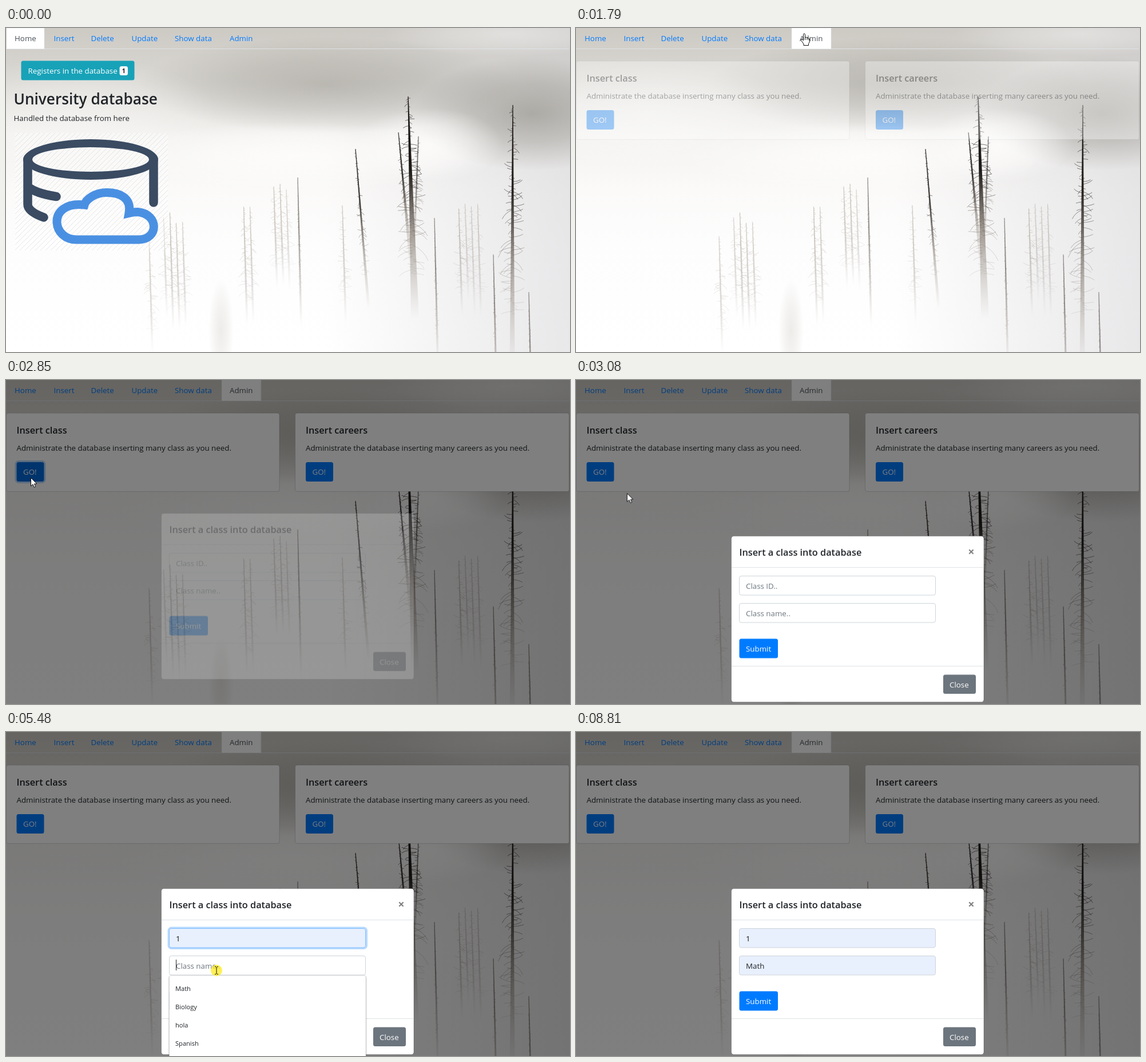
These frames come from a looping animation (986x568 px, 9.67 s). An HTML page with a canvas:

```html
<!DOCTYPE html>
<html lang="en">
<head>
<meta charset="utf-8">
<title>University database</title>
<style>
html, body { margin: 0; width: 986px; height: 568px; overflow: hidden; background: #fff; }
canvas, svg { position: absolute; left: 0; top: 0; display: block; }
svg { font: 13.34px 'Open Sans', 'Noto Sans', sans-serif; fill: #212529; }
.h5 { font-size: 16.3px; font-weight: 600; }
.h2 { font-size: 26.2px; font-weight: 600; }
.link { fill: #007bff; }
.light { fill: #fff; }
.tab { fill: #fff; stroke: #dee2e6; stroke-width: .6; }
.card { fill: #fff; stroke: rgba(0, 0, 0, .14); }
.modal { fill: #fff; stroke: rgba(0, 0, 0, .25); }
.rule { stroke: #dee2e6; }
.blue { fill: #007bff; }
.field { fill: #fff; stroke: #ced4da; }
.hint { fill: #6c757d; }
.ring { fill: none; stroke: rgba(0, 123, 255, .28); stroke-width: 3; }
.caret { stroke: #222; }
.list { font-size: 11.1px; font-weight: 500; filter: drop-shadow(0 1px 1px rgba(0, 0, 0, .45)); }
.list .box { fill: #fff; stroke: #d4d4d4; stroke-width: .6; }
.hot { fill: #e8e8e8; }
.bar { fill: none; stroke: #3a4b62; stroke-width: 15.5; stroke-linecap: round; }
.cursor { fill: #fff; stroke: #111; stroke-linejoin: round; }
</style>
</head>
<body>
<canvas id="photo" width="986" height="568"></canvas>
<svg width="986" height="568" viewBox="0 0 986 568">
  <defs>
    <pattern id="hatch" width="9" height="9" patternUnits="userSpaceOnUse">
      <path d="M-1 10L10 -1" stroke="#bbb" stroke-opacity=".45" stroke-width=".8"/>
    </pattern>
  </defs>

  <path class="rule" d="M0 36.5H984"/>
  <path class="tab" id="homeTab" d="M1 36.5V0H67V36.5"/>
  <path id="showTab" d="M280.5 36V0M375.5 36V0" stroke="#e9ecef"/>
  <path class="tab" id="adminTab" d="M377 36.5V0H446V36.5"/>
  <g class="link">
    <text id="homeLink" x="15" y="23">Home</text>
    <text x="83.5" y="23">Insert</text>
    <text x="148.5" y="23">Delete</text>
    <text x="219.5" y="23">Update</text>
    <text id="showLink" x="295" y="23">Show data</text>
    <text id="adminLink" x="391" y="23">Admin</text>
  </g>

  <g id="home">
    <rect x="26.5" y="57.5" width="198" height="34" rx="3.5" fill="#17a2b8"/>
    <text class="light" x="38.5" y="80">Registers in the database</text>
    <rect x="198.5" y="67" width="14.5" height="16" rx="3.5" fill="#f8f9fa"/>
    <text x="202.7" y="79" font-size="10.5" font-weight="700">1</text>
    <text class="h2" x="13.5" y="134">University database</text>
    <text x="13.5" y="162.5">Handled the database from here</text>
    <rect x="16" y="184" width="267" height="206" fill="#fff" fill-opacity=".35"/>
    <rect x="16" y="184" width="267" height="206" fill="url(#hatch)"/>
    <path fill="#3a4b62" fill-rule="evenodd" d="M30 230.5a118 35.5 0 0 1 236 0a118 35.5 0 0 1 -236 0M46 230.5a102 21.5 0 0 0 204 0a102 21.5 0 0 0 -204 0"/>
    <path class="bar" d="M38 230V309Q38 322 66 332M38 278Q52 290 88 295.5M258 230V306"/>
    <path fill="none" stroke="#4a90e2" stroke-width="15" d="M123 371H232C267 371 268 326 230 322.5C224 322.5 219 323.5 215 324.5C220 297 198 288.5 176 288.5C156 288.5 140 300 137 310C104 306 88 323 89 341C90 358 104 371 123 371Z"/>
  </g>

  <g id="cards">
    <rect class="card" x=".5" y="58" width="477.5" height="137.5" rx="3.5"/>
    <text class="h5" x="18.5" y="94">Insert class</text>
    <text x="18.5" y="124">Administrate the database inserting many class as you need.</text>
    <rect class="ring" id="goRing" x="17" y="142.5" width="51" height="37" rx="5" style="stroke-opacity:1"/>
    <rect class="blue" id="go" x="18.5" y="144" width="48" height="34" rx="3.5"/>
    <text class="light" x="30" y="166">GO!</text>
    <rect class="card" x="505.5" y="58" width="479" height="137.5" rx="3.5"/>
    <text class="h5" x="524" y="94">Insert careers</text>
    <text x="524" y="124">Administrate the database inserting many careers as you need.</text>
    <rect class="blue" x="524" y="144" width="48" height="34" rx="3.5"/>
    <text class="light" x="535.5" y="166">GO!</text>
  </g>

  <rect id="dim" width="986" height="568" fill="#000"/>

  <g id="modal">
    <rect class="modal" x="271.5" y="274.5" width="441.5" height="291" rx="4.5"/>
    <text class="h5" x="285.5" y="308.5">Insert a class into database</text>
    <text x="691" y="308.5" font-size="20" font-weight="700" fill="#7f7f7f" text-anchor="middle">×</text>
    <path class="rule" d="M272 329.5H713M272 502.5H713"/>
    <rect class="ring" id="ring1" x="284" y="343" width="346.5" height="36.5" rx="5"/>
    <rect class="field" id="field1" x="285.5" y="344.5" width="343" height="33.5" rx="3.5"/>
    <text class="hint" id="hint1" x="297" y="366.5">Class ID..</text>
    <text id="value1" x="297" y="366.5">1</text>
    <path class="caret" id="caret1" d="M297.5 351V370"/>
    <path class="caret" id="caret1b" d="M305.5 351V370"/>
    <rect class="ring" id="ring2" x="284" y="391" width="346.5" height="36.5" rx="5"/>
    <rect class="field" id="field2" x="285.5" y="392.5" width="343" height="33.5" rx="3.5"/>
    <text class="hint" id="hint2" x="297" y="414.5">Class name..</text>
    <text id="value2" x="297" y="414.5">Math</text>
    <path class="caret" id="caret2" d="M297.5 399V418"/>
    <rect class="blue" id="submit" x="285.5" y="454.5" width="67.5" height="34" rx="3.5"/>
    <text class="light" x="297" y="476.5">Submit</text>
    <rect x="642" y="517.5" width="57" height="33.5" rx="3.5" fill="#6c757d"/>
    <text class="light" x="653" y="539.5">Close</text>
  </g>

  <g class="list" id="allIds">
    <rect class="box" x="285.5" y="379" width="343.5" height="208" rx="3"/>
  </g>
  <g class="list" id="oneId">
    <rect class="box" x="285.5" y="379" width="343.5" height="47" rx="3"/>
    <rect class="hot" id="hot1" x="286" y="386" width="343" height="32"/>
  </g>
  <g class="list" id="names">
    <rect class="box" x="285.5" y="427" width="343.5" height="176" rx="3"/>
    <rect class="hot" id="hot2" x="286" y="434" width="343" height="32"/>
  </g>

  <g id="pointer">
    <circle id="click" r="10" fill="#ffeb1f" fill-opacity=".75"/>
    <path class="cursor" id="arrow" d="M.5 .5V15L4 11.8L6.3 17L8.7 16L6.5 11H11Z"/>
    <path class="cursor" id="hand" d="M-1.5 12V1.5Q-1.5 0 0 0T1.5 1.5V7Q4.5 5 5 7.5Q8 6.5 8 9Q10 8.5 9.5 11L9 15L7.5 17.5V20.5H-1V18L-5.5 11.5Q-6 9 -4 9.5ZM1.5 7V11M5 7.5V11M8 9V11.5"/>
    <path id="beam" d="M-3 -6.5H-1L0 -5.5L1 -6.5H3M0 -5.5V5.5M-3 6.5H-1L0 5.5L1 6.5H3" fill="none" stroke="#111"/>
  </g>
</svg>

<script>
const LOOP = 9670, FRAME = 1000 / 13;
let css = '', count = 0;

// Hard-stepped CSS keyframes from [ms, declarations] pairs.
function track(id, stops) {
  const name = 'k' + count++;
  const frames = stops.map(([ms, rule]) => `${(ms / LOOP * 100).toFixed(3)}%{${rule}}`);
  css += `@keyframes ${name}{${frames.join('')}}#${id}{animation:${name} ${LOOP}ms step-end infinite}`;
}

// A smooth change, sampled at the frame rate; rule(k) gives the declarations for k from 0 to 1.
function glide(start, end, rule) {
  const stops = [];
  for (let t = Math.ceil(start / FRAME) * FRAME; t < end; t += FRAME) stops.push([t, rule((t - start) / (end - start))]);
  return [...stops, [Math.ceil(end / FRAME) * FRAME, rule(1)]];
}
const animate = (id, start, end, rule) => track(id, [[0, rule(0)], ...glide(start, end, rule)]);

function swap(id, start, end, before, during, after = before) {
  track(id, [[0, before], [start, during], [end, after]]);
}

// Visible during the [from, to] spans only.
function show(id, ...spans) {
  track(id, [[0, 'visibility:hidden'], ...spans.flatMap(([from, to]) => [
    [from, 'visibility:visible'], [Math.min(to, LOOP), 'visibility:hidden']
  ])]);
}

const at = {
  hoverTab: 1160, hoverAdmin: 1310, openTab: 1620, openDialog: 2620, focusId: 3620, typeId: 4320,
  previewId: 5020, pickId: 5170, focusName: 5400, previewName: 5870, pickName: 6180, submit: 7270, leave: 8430
};

// Tabs and page content
const link = 'fill:#007bff', hovered = 'fill:#0056b3', active = 'fill:#495057';
show('homeTab', [0, at.openTab]);
show('showTab', [at.hoverTab, at.hoverAdmin]);
show('adminTab', [at.openTab, LOOP]);
track('homeLink', [[0, active], [at.openTab, link]]);
swap('showLink', at.hoverTab, at.hoverAdmin, link, hovered);
swap('adminLink', at.hoverAdmin, at.openTab, link, hovered, active);
animate('home', 1567, 1717, k => `opacity:${1 - k}`);
animate('cards', 1717, 1867, k => `opacity:${k}`);
swap('go', 2460, 2930, link, 'fill:#0069d9');
show('goRing', [at.openDialog, 3000]);

// Dialog
animate('dim', 2667, 2817, k => `opacity:${k / 2}`);
animate('modal', 2817, 3117, k => `opacity:${Math.min(1, k * 2)};transform:translateY(${-50 * (1 - k) ** 2}px)`);

// Form
const state = (fill, stroke) => `fill:${fill};stroke:${stroke}`;
const plain = state('#fff', '#ced4da'), focus = state('#fff', '#80bdff');
const filled = state('#e8f0fe', '#ced4da'), filledFocus = state('#e8f0fe', '#80bdff');
const ringMoves = at.focusName + 170, blur = 6800;
track('field1', [[0, plain], [at.focusId, focus], [at.previewId, filledFocus], [ringMoves, filled]]);
track('field2', [[0, plain], [ringMoves, focus], [at.previewName, filledFocus], [blur, filled]]);
show('ring1', [at.focusId, ringMoves]);
show('ring2', [ringMoves, blur]);
swap('hint1', at.typeId, LOOP, 'opacity:1', 'opacity:0');
swap('hint2', at.previewName, LOOP, 'opacity:1', 'opacity:0');
swap('value1', at.typeId, at.previewId, 'opacity:0', 'opacity:1;' + active, 'opacity:1;fill:#111');
swap('value2', at.previewName, LOOP, 'opacity:0', 'opacity:1');
show('caret1', [at.focusId, 4150]);
show('caret1b', [at.typeId, at.previewId]);
show('caret2', [at.focusName + 80, at.previewName]);
show('allIds', [at.focusId + 80, at.typeId]);
show('oneId', [at.typeId, at.pickId]);
show('names', [at.focusName + 80, at.pickName]);
show('hot1', [4950, at.pickId]);
show('hot2', [5800, at.pickName]);
swap('submit', 7190, at.leave, link, 'fill:#0069d9');

function fillList(id, y, words) {
  document.getElementById(id).insertAdjacentHTML('beforeend',
    words.map((word, i) => `<text x="296" y="${y + i * 32}">${word}</text>`).join(''));
}
fillList('allIds', 406, [1, 2, 3, 4, 5, 6]);
fillList('oneId', 406, [1]);
fillList('names', 454, ['Math', 'Biology', 'hola', 'Spanish']);

// Pointer: each move eases to a place and may change the shape on the way
const spot = (x, y) => `transform:translate(${x}px,${y}px)`;
let place = [884, 540], shape = 'none', since = 0;
const path = [[0, spot(...place)]], spans = { arrow: [], hand: [], beam: [], none: [] };

function wear(ms, next) {
  spans[shape].push([since, ms]);
  [shape, since] = [next, ms];
}

function move(start, end, x, y, onWay, onArrival = onWay) {
  const [x0, y0] = place;
  wear(start, onWay);
  path.push(...glide(start, end, k => {
    const e = k * k * (3 - 2 * k);
    return spot(x0 + (x - x0) * e, y0 + (y - y0) * e);
  }));
  place = [x, y];
  wear(end, onArrival);
}

move(380, at.hoverTab, 335, 22, 'arrow', 'hand');
move(at.hoverTab, 1470, 399, 10, 'hand');
move(1850, 2540, 43, 171, 'arrow', 'hand');
wear(2770, 'arrow');
move(2930, 3540, 357, 358, 'arrow', 'beam');
move(3770, 3850, 356, 334, 'beam', 'arrow');
wear(4700, 'none');
move(4870, at.previewId, 356, 400, 'arrow');
move(at.pickId, at.focusName, 368, 418, 'arrow', 'beam');
move(5650, 5800, 368, 458, 'beam', 'arrow');
move(at.pickName, 7090, 349, 472, 'arrow', 'hand');
move(7180, at.submit, 337, 472, 'hand');
wear(8050, 'arrow');
move(at.leave, 8810, 780, 560, 'arrow', 'none');
track('pointer', path);
for (const id of ['arrow', 'hand', 'beam']) show(id, ...spans[id]);
show('click', ...['openTab', 'openDialog', 'focusId', 'pickId', 'focusName', 'pickName', 'submit'].map(key => [at[key], at[key] + 150]));

// Misty forest backdrop
const ctx = document.getElementById('photo').getContext('2d');
let seed = 7;
const rand = () => (seed = seed * 16807 % 2147483647) / 2147483647;

function ramp(gradient, ...colors) {
  colors.forEach((color, i) => gradient.addColorStop(i / (colors.length - 1), color));
  return gradient;
}

function haze(x, y, rx, ry, rgb, alpha) {
  ctx.save();
  ctx.translate(x, y);
  ctx.scale(rx, ry);
  ctx.fillStyle = ramp(ctx.createRadialGradient(0, 0, 0, 0, 0, 1),
    `rgba(${rgb},${alpha})`, `rgba(${rgb},${alpha * .6})`, `rgba(${rgb},0)`);
  ctx.fillRect(-1, -1, 2, 2);
  ctx.restore();
}

// A tapering trunk with random twigs that dissolves into the fog.
function tree(x, top, height, lean, width, reach, rgb, alpha) {
  ctx.fillStyle = ctx.strokeStyle = ramp(ctx.createLinearGradient(0, top, 0, top + height),
    `rgba(${rgb},${alpha})`, `rgba(${rgb},${alpha})`, `rgba(120,109,96,${alpha * .5})`, 'rgba(160,150,138,.0)');
  ctx.beginPath();
  ctx.moveTo(x - .6, top);
  ctx.lineTo(x + .6, top);
  ctx.lineTo(x + lean + width / 2, top + height);
  ctx.lineTo(x + lean - width / 2, top + height);
  ctx.fill();
  ctx.lineWidth = .6;
  ctx.beginPath();
  for (let y = 3; y < height * .8; y += 1 + rand() * 4) {
    const k = y / height, x0 = x + lean * k, y0 = top + y;
    const span = reach * Math.min(1, .2 + k * 1.6) * rand() * (rand() < .5 ? -1 : 1);
    const drop = Math.abs(span) * (rand() * 1.6 - .5);
    ctx.moveTo(x0, y0);
    ctx.quadraticCurveTo(x0 + span * .7, y0 + drop * .3, x0 + span, y0 + drop);
  }
  ctx.stroke();
}

ctx.fillStyle = ramp(ctx.createLinearGradient(0, 0, 0, 568),
  '#cdcac4', '#dad8d3', '#f3f2f0', '#fbfaf9', '#fdfdfd', '#fefefe', '#fff');
ctx.fillRect(0, 0, 986, 568);
ctx.fillStyle = ramp(ctx.createLinearGradient(560, 0, 986, 0), 'rgba(205,204,207,0)', 'rgba(205,204,207,.45)');
ctx.fillRect(560, 0, 426, 568);
const shade = '140,137,129', mist = '255,254,253';
haze(560, 100, 330, 85, shade, .42);
haze(920, 150, 210, 100, shade, .6);
haze(120, 150, 250, 100, mist, .4);
haze(500, 225, 320, 60, mist, .75);
haze(740, 205, 130, 65, mist, .75);
haze(880, 10, 220, 40, mist, .4);

// Distant groves: each a few pale trunks around a centre
const pale = '150,138,122';
for (const [x, top, trunks] of [[250, 365, 1], [292, 317, 4], [421, 313, 2], [479, 260, 3], [588, 290, 1], [808, 300, 4]]) {
  for (let i = 0; i < trunks; i++) {
    const offset = (i + .5 - trunks / 2) * 11;
    tree(x + offset, top + rand() * 25, 170 + rand() * 40, 6, 4, 14, pale, .3 + rand() * .15);
  }
}
haze(376, 530, 22, 90, pale, .16);

// Nearer trees, x and top
const ink = '30,26,23', grey = '95,87,80';
for (const [x, top] of [[510, 262], [749, 333], [852, 397], [914, 463]]) tree(x, top, 260, 6, 4, 4, grey, .65);
tree(611, 212, 280, 23, 5, 9, ink, .85);
tree(686, 183, 230, 22, 6, 10, ink, .85);
tree(721, 190, 210, -8, 4, 14, ink, .6);
tree(703, 120, 390, 12, 14, 28, ink, 1);
tree(886, 135, 460, -1, 9, 26, ink, .95);

const sheet = document.createElement('style');
sheet.textContent = css;
document.head.append(sheet);
</script>
</body>
</html>
```
